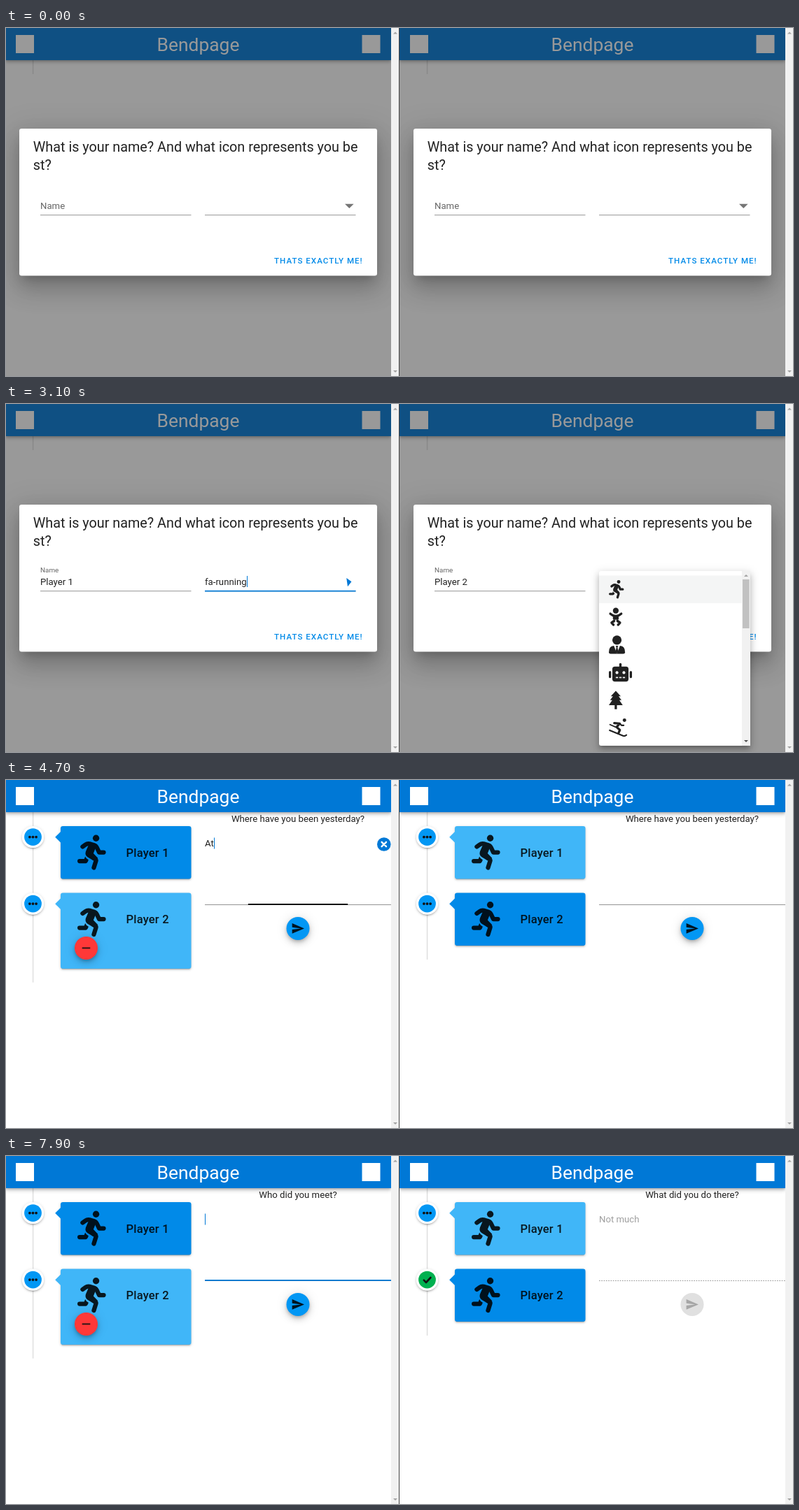
Recreate the animation shown at these times as an HTML page. Size 1124 by 498 pixels, loop 8 s.

```html
<!DOCTYPE html>
<html lang="en">
<head>
<meta charset="utf-8">
<title>Bendpage</title>
<style>
html, body { margin: 0; width: 100%; height: 100%; overflow: hidden; background: #fff; }
svg { display: block; width: 1124px; height: 498px; }
text { font-family: Roboto, sans-serif; white-space: pre; }
</style>
</head>
<body>
<svg id="stage" viewBox="0 0 1124 498" xmlns="http://www.w3.org/2000/svg"></svg>
<script>
const stage = document.getElementById('stage');
const LOOP = 8000, U = 0.826;
const BLUE = '#0078d6', BRIGHT = '#0297f4', DARK = '#018ae8', LIGHT = '#40b6f8', INK = 'rgba(0,0,0,.87)';
const RULE = 'rgba(0,0,0,.42)';
const pen = document.createElement('canvas').getContext('2d');

const clamp = v => Math.max(0, Math.min(1, v));
// Progress of a transition that started at a; nothing happens before a.
const prog = (t, a, d = 300) => t < a ? 0 : clamp((t - a + 50) / d);
const ease = p => 1 - Math.pow(1 - p, 1.5);
const within = (t, a, b) => t >= a && t < b;
const width = (s, size = 13.2) => {
  pen.font = `${size}px Roboto, sans-serif`;
  return pen.measureText(s).width;
};
const last = (steps, t) => steps.reduce((s, [at, v]) => t >= at ? v : s, '');

const rect = (x, y, w, h, fill, r = 0, more = '') =>
  `<rect x="${x}" y="${y}" width="${w}" height="${h}" rx="${r}" fill="${fill}" ${more}/>`;
const disc = (x, y, r, fill, more = '') => `<circle cx="${x}" cy="${y}" r="${r}" fill="${fill}" ${more}/>`;
const path = (d, fill, more = '') => `<path d="${d}" fill="${fill}" ${more}/>`;
const line = (d, w, color) =>
  path(d, 'none', `stroke="${color}" stroke-width="${w}" stroke-linecap="round" stroke-linejoin="round"`);
const label = (x, y, s, size = 13.2, fill = INK, more = '') =>
  `<text x="${x}" y="${y}" font-size="${size}" fill="${fill}" ${more}>${s}</text>`;
const group = (attrs, body) => `<g ${attrs}>${body}</g>`;
const caret = (x, y) => rect(Math.round(x), y, 1, 16, BLUE);

// Layers are [offset, blur, spread, alpha].
const shadow = (x, y, w, h, r, layers) => layers.map(([dy, blur, sp, a]) =>
  rect(x - sp * U, y + (dy - sp) * U, w + 2 * sp * U, h + 2 * sp * U, '#000', Math.max(0, r + sp * U),
    `fill-opacity="${a}" style="filter:blur(${blur * U / 2}px)"`)).join('');
const LOW = [[3, 1, -2, .2], [2, 2, 0, .14], [1, 5, 0, .12]];
const BAR = [[2, 4, -1, .2], [4, 5, 0, .14], [1, 10, 0, .12]];
const FAB = [[3, 5, -1, .2], [6, 10, 0, .14], [1, 18, 0, .12]];
const MENU = [[5, 5, -3, .2], [8, 10, 1, .14], [3, 14, 2, .12]];
const MODAL = [[11, 15, -7, .2], [24, 38, 3, .14], [9, 46, 8, .12]];

const runner = c => disc(272, 48, 48, c)
  + line('M76 173L118 142Q145 122 178 130L245 150Q270 157 284 185L318 256H384', 64, c)
  + path('M160 155L122 243Q106 298 148 324L233 374 300 340 234 271 265 192 285 190 250 120Z', c)
  + line('M235 338L262 354Q276 364 271 380L240 480', 64, c)
  + path('M114 317L99 352H32A32 32 0 0 0 32 416H109Q141 416 154 387L162 366Q128 350 114 317Z', c);
const K = '#212121';
const icons = [
  runner(K),
  disc(192, 80, 80, K) + line('M40 165L112 212Q192 245 272 212L344 165', 64, K) + rect(112, 200, 160, 130, K, 20)
    + line('M145 365L78 415 126 470M239 365L306 415 258 470', 70, K),
  disc(224, 128, 128, K) + path('M0 464Q0 300 134 288H314Q448 300 448 464 448 512 400 512H48Q0 512 0 464Z', K)
    + path('M140 288H308L224 505Z', '#fff') + path('M192 288H256L240 335 262 440 224 500 186 440 208 335Z', K),
  rect(288, 0, 64, 140, K, 30) + rect(96, 96, 448, 416, K, 70) + rect(0, 224, 64, 192, K, 28)
    + rect(576, 224, 64, 192, K, 28) + disc(224, 264, 40, '#fff') + disc(416, 264, 40, '#fff')
    + [192, 288, 384].map(x => rect(x, 384, 64, 32, '#fff')).join(''),
  path('M192 0L330 150H270L350 260H290L384 400H224V512H160V400H0L94 260H34L114 150H54Z', K),
  disc(432, 48, 48, K) + line('M150 130L300 140 215 240 305 320 270 400', 62, K)
    + line('M300 140L350 190H410', 44, K) + line('M24 330L390 480Q440 500 485 460', 44, K) + line('M30 170L190 240', 34, K)
];

const tri = (x, y, dir, c, s = 3) => path(`M${x - s} ${y}h${2 * s}l${-s} ${dir * s}z`, c);

function header() {
  return shadow(-1, 0, 551, 46, 0, BAR) + rect(-1, 0, 551, 46, BLUE)
    + rect(14, 10, 26, 26, '#fff') + rect(508.5, 10, 26, 26, '#fff')
    + label(274.5, 32.5, 'Bendpage', 26.4, '#fff', 'text-anchor="middle"');
}

function dot(y, done) {
  const mark = done
    ? line(`M33.8 ${y + .5}l3.2 3.4 6.4 -7`, 2.6, '#111')
    : [-4.6, 0, 4.6].map(d => disc(38.5 + d, y, 1.9, '#111')).join('');
  return shadow(22.8, y - 15.7, 31.4, 31.4, 15.7, LOW) + disc(38.5, y, 15.7, '#fff')
    + disc(38.5, y, 12.4, done ? '#00b04f' : BRIGHT) + mark;
}

function card(y, h, name, color, done) {
  return dot(y + 15.6, done) + shadow(78, y, 186.5, h, 3, LOW)
    + path(`M78.5 ${y + 7.5}l-8.3 8.3 8.3 8.3z`, color) + rect(78, y, 186.5, h, color, 3.3)
    + group(`transform="translate(102 ${y + 12.6}) scale(.0977)" opacity=".87"`, runner('#000'))
    + label(171.5, y + 43.5, name, 16.5, INK, 'font-weight="500" letter-spacing=".2"');
}

function sendButton(state) {
  const off = state === 'off';
  return (state === 'on' || state === 'press' || state === 'bare' ? shadow(400.5, 196, 33, 33, 16.5, state === 'press' ? MENU : FAB) : '')
    + disc(417, 212.4, 16.5, off ? '#e0e0e0' : BRIGHT)
    + (state === 'bare' ? '' : group('transform="translate(407 202.5) scale(.826)"',
      path('M2,21L23,12L2,3V10L17,12L2,14V21Z', '#000', `fill-opacity="${off ? .26 : state === 'wake' ? .58 : .87}"`)));
}

const typed = [
  [[4700, 'At'], [4800, 'At t'], [4900, 'At the'], [5000, 'At the be'], [5100, 'At the beach'], [5800, ''],
   [6300, 'Watched a'], [6500, 'Watched a m'], [6700, 'Watched a mo'], [6800, 'Watched a movie'], [7900, '']],
  [[5000, 'In'], [5100, 'In th'], [5200, 'In the'], [5300, 'In the pa'], [5400, 'In the park'], [5800, ''],
   [6300, 'N'], [6500, 'Not m'], [6700, 'Not muc'], [6800, 'Not much']]
];
// Focus intervals of the answer field: [start, end].
const focus = [[[4630, 5600], [6250, LOOP]], [[4900, 5800], [6250, 7000]]];

function answer(t, me) {
  const off = me ? t >= 7000 : within(t, 5600, 5800);
  const s = last(typed[me], t);
  let out = off
    ? path('M284 178.5H550', 'none', `stroke="${RULE}" stroke-dasharray="1.65 1.65"`)
    : rect(284, 178, 266, 1, RULE);
  const span = focus[me].find(([a, b]) => within(t, a, b + 300));
  let live = false;
  if (span && !off) {
    live = t < span[1];
    const grow = ease(prog(t, span[0])), k = live ? grow : 1 - ease(prog(t, span[1]));
    out += rect(417 - 133 * k, 177, 266 * k, 1.8, live && grow < 1 ? '#000' : BLUE);
  }
  out += label(284, 94.7, s, 13.2, off ? 'rgba(0,0,0,.38)' : INK);
  if (live) out += caret(284 + width(s), 82.5);
  if (s && !off) out += disc(539.8, 92, 9.8, BLUE) + line('M536.6 88.8l6.4 6.4m0 -6.4l-6.4 6.4', 2.4, '#fff');
  const state = off ? 'off' : !me && within(t, 5800, 6000) ? 'wake'
    : !me && t < 3800 ? 'bare' : !me && t === 7300 ? 'press' : 'on';
  return out + sendButton(state);
}

function board(t, me) {
  if (t < 3500) return rect(37.8, 46, 1.6, 20, 'rgba(0,0,0,.12)');
  const two = t >= 4000, tall = two && !me;
  const end = !two ? 161 : tall ? 289.7 : 257;
  const ask = t < 5800 ? 'Where have you been yesterday?'
    : !me && t >= 7900 ? 'Who did you meet?' : 'What did you do there?';
  let out = rect(37.8, 46, 1.6, end - 46, 'rgba(0,0,0,.12)')
    + label(417, 60.2, ask, 13.2, INK, 'text-anchor="middle"')
    + card(66, 75.5, 'Player 1', me ? LIGHT : DARK, within(t, 5600, 5800));
  if (two) out += card(161.5, tall ? 108.5 : 75.5, 'Player 2', me ? DARK : LIGHT, t >= 7000 && (me || t < 7900));
  if (tall) out += shadow(98, 224, 33, 33, 16.5, FAB) + disc(114.5, 240.4, 16.5, '#ff3838')
    + rect(108.7, 239.6, 11.6, 1.7, '#111');
  return out + answer(t, me);
}

const names = [
  [[300, 'P'], [400, 'Pl'], [500, 'Play'], [600, 'Playe'], [700, 'Player'], [800, 'Player 1']],
  [[500, 'P'], [600, 'Pl'], [700, 'Pla'], [800, 'Playe'], [1000, 'Player'], [1100, 'Player 2']]
];
const form = [
  { focus: 200, blink: 1400, blur: 1900, pick: 3100, leave: 3500 },
  { focus: 400, blink: 1700, blur: 2100, pick: 3300, leave: 4000 }
];

function nameField(t, me, f) {
  const s = last(names[me], t), live = within(t, f.focus, f.blur);
  const up = ease(prog(t, f.focus)), k = live ? up : t >= f.blur ? 1 - ease(prog(t, f.blur)) : 0;
  let out = rect(49, 267.2, 215.5, 1, RULE)
    + label(49, 258.7 - 18 * up, 'Name', 13.2 - 3.3 * up, live ? BLUE : 'rgba(0,0,0,.6)')
    + label(49, 258.7, s);
  if (k) out += rect(156.75 - 107.75 * k, 266.8, 215.5 * k, 1.7, BLUE)
    + label(49, 282.5, 'You remember who you are? Good!', 9.9, 'rgba(0,0,0,.6)', `opacity="${k}"`);
  if (live && t < f.blink) out += caret(49 + width(s), 246);
  return out;
}

function selectField(t, me, f) {
  const open = f.blur + 100, live = within(t, open, f.leave);
  const k = live ? ease(prog(t, open)) : t >= f.leave ? 1 - ease(prog(t, f.leave)) : 0;
  const turn = t < open ? 0 : t < f.pick ? -180 : t === f.pick ? -98 : 0;
  let out = rect(284, 267.2, 215.5, 1, RULE)
    + group(`transform="rotate(${turn} 490.2 254.8)"`, path('M484 251.7h12.6l-6.3 6.4z', live ? BLUE : '#757575'));
  if (k) out += rect(391.75 - 107.75 * k, 266.8, 215.5 * k, 1.7, BLUE);
  if (t >= f.pick) {
    const w = width('fa-running');
    out += label(284, 258.7, 'fa-running');
    if (live) out += caret(284 + w, 246);
    if (me && live && t >= 3500) {
      let d = 'M284 261';
      for (let x = 0; x < w - 2; x += 4) d += 'l2 -1.6 2 1.6';
      out += path(d, 'none', 'stroke="#e03030" stroke-width=".9"');
    }
  }
  return out;
}

function menu(t, f) {
  const p = within(t, f.blur + 100, f.pick) ? ease(prog(t, f.blur + 100, 250)) : 0;
  if (!p) return '';
  const items = icons.map((icon, i) =>
    group(`transform="translate(298 ${252 + i * 39.6}) scale(.0516)"`, icon)).join('');
  return group(`opacity="${p}" transform="translate(284 239) scale(${p}) translate(-284 -239)"`,
    shadow(284, 239, 216, 250, 3, MENU) + rect(284, 239, 216, 250, '#fff', 3)
    + rect(284, 245.5, 204, 39.6, '#f4f5f5') + items
    + rect(488, 239, 12, 250, '#f1f1f1') + rect(489, 251, 9.6, 70, '#c1c1c1')
    + tri(494, 247, -1, '#a3a3a3') + tri(494, 481, 1, '#505050'));
}

function dialog(t, me) {
  const f = form[me], p = prog(t, f.leave);
  if (p === 1) return '';
  const press = t >= f.leave ? rect(400, 318, 92, 31, 'rgba(2,136,232,.25)', 3) : '';
  const body = shadow(19, 144, 511, 210.5, 3.3, MODAL) + rect(19, 144, 511, 210.5, '#fff', 3.3)
    + label(38.8, 177, 'What is your name? And what icon represents you be', 19.8)
    + label(38.8, 203.4, 'st?', 19.8)
    + nameField(t, me, f) + selectField(t, me, f) + press
    + label(383, 337.4, 'THATS EXACTLY ME!', 11.56, DARK, 'font-weight="500" letter-spacing="1.03"');
  return rect(-1, 0, 551, 498, '#212121', 0, `fill-opacity="${.46 * (1 - p)}"`)
    + group(`opacity="${1 - p}" transform="translate(274.5 249.2) scale(${1 - p / 2}) translate(-274.5 -249.2)"`, body)
    + menu(t, f);
}

function scrollbar() {
  return rect(550, 0, 11.2, 498, '#f1f1f1') + tri(556, 8.5, -1, '#a3a3a3') + tri(556, 490, 1, '#a3a3a3');
}

function panel(t, me) {
  return group(`transform="translate(${me * 563} 0)"`,
    group('clip-path="url(#pane)"', board(t, me) + header() + dialog(t, me)) + scrollbar());
}

let shown = -1;
function draw(now) {
  const t = Math.floor(now % LOOP / 100) * 100;
  if (t !== shown) {
    shown = t;
    stage.innerHTML = '<clipPath id="pane"><rect x="-1" y="0" width="551" height="498"/></clipPath>'
      + rect(0, 0, 1124, 498, '#fff') + panel(t, 0) + panel(t, 1) + rect(561, 0, 1, 498, '#444');
  }
  requestAnimationFrame(() => draw(performance.now() - start));
}
const start = performance.now();
draw(0);
</script>
</body>
</html>
```
